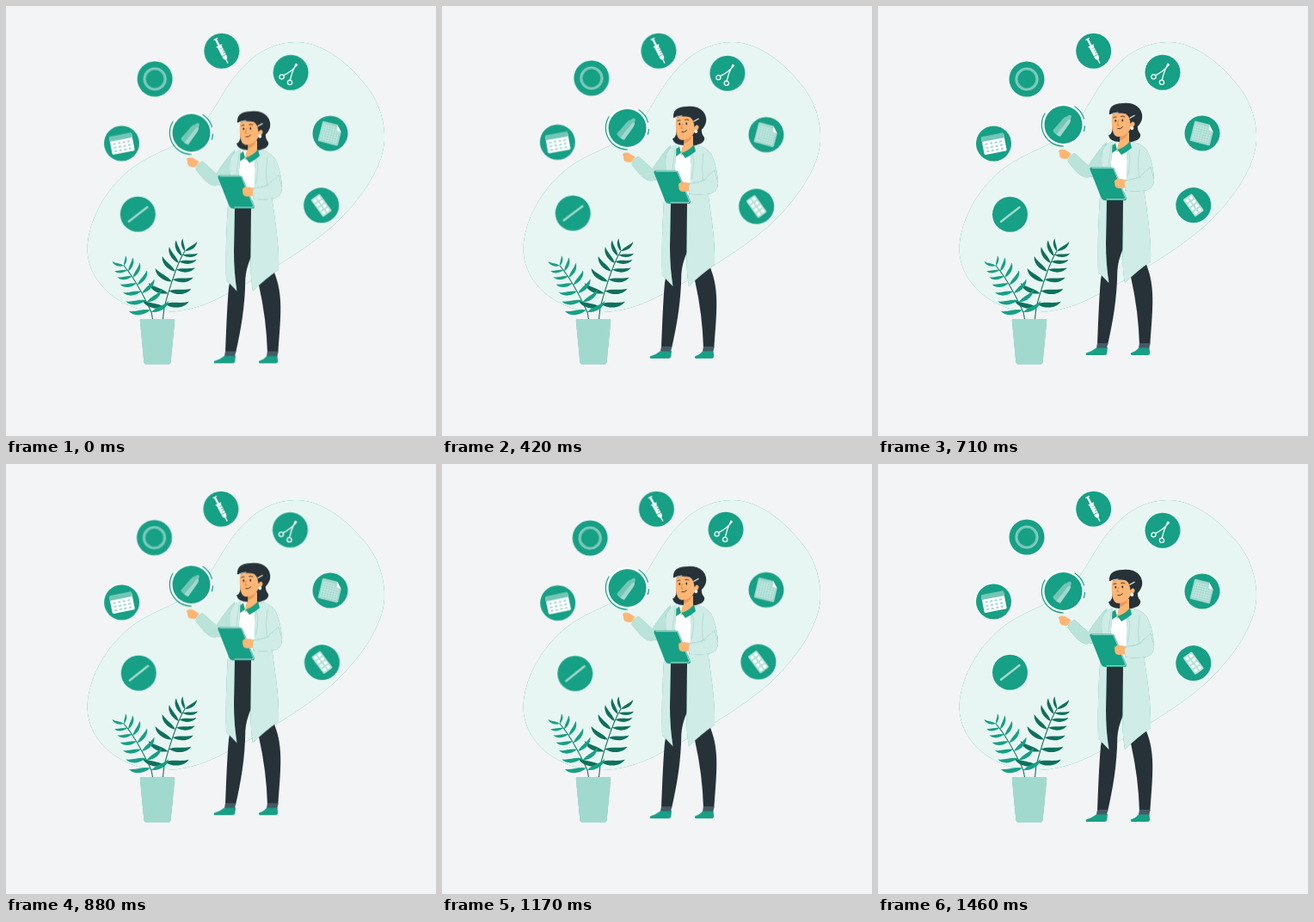
An HTML page for the animation above (1.5 s loop, 500x500 px).

```html
<!DOCTYPE html>
<html lang="en">
<head>
<meta charset="utf-8">
<title>Health care</title>
<style>
  html, body { margin: 0; height: 100%; overflow: hidden; background: #f3f4f6; }
  svg { display: block; width: 100vw; height: 100vh; }
  .teal { fill: #16a085; }
  .dark { fill: #263238; }
  .skin { fill: #ffb573; }
  .white { fill: #fff; }
  .line { fill: none; stroke-linecap: round; stroke-linejoin: round; }
  #orbit { transform-origin: 255.8px 147px; animation: sway 1.5s -40ms linear infinite; }
  #doctor { animation: rise 1.5s -40ms linear infinite; }
  @keyframes sway {
    0%, 100% { transform: rotate(0deg); }
    25% { transform: rotate(1deg); }
    75% { transform: rotate(-1deg); }
  }
  @keyframes rise {
    0%, 100% { transform: translateY(0); }
    50% { transform: translateY(-10px); }
  }
</style>
</head>
<body>
<svg viewBox="0 0 500 500">
  <path data-tint=".9" d="M337 42C372 42 402 71 420 94C434 112 441 135 440 157C438 188 414 224 380 256C345 286 300 312 262 332C240 345 212 357 178 356C138 355 95 326 94.5 282C96 250 113 217 142 192C172 168 205 164 228 139C248 115 255 88 285 62C298 51 316 42 337 42Z"/>

  <g id="plant"></g>
  <path data-tint=".6" d="M157.5 364H194.5Q196.4 364 196.2 366L191.6 414Q191.3 416.5 189 416.5H163Q160.700 416.5 160.4 414L155.8 366Q155.6 364 157.5 364Z"/>

  <g id="orbit">
    <g transform="translate(153.5 242.3)">
      <path class="line" stroke="#a2d9ce" stroke-width="2.4" d="M-10.5 8.5L11-8.3"/>
    </g>
    <g transform="translate(134.5 160)">
      <g id="calendar" transform="rotate(-11)">
        <rect class="white" x="-13" y="-9.5" width="26.5" height="20.5" rx="1.5"/>
        <path fill="#73c6b6" d="M-13-4.5V-9Q-13-10.5-11.5-10.5H12Q13.5-10.5 13.5-9V-4.5Z"/>
      </g>
    </g>
    <g transform="translate(173 85)">
      <circle class="line" r="12" stroke="#73c6b6" stroke-width="3.2"/>
      <circle class="line" r="12.8" stroke="#a2d9ce" stroke-width=".5"/>
    </g>
    <g transform="translate(250.7 52.3)">
      <g transform="rotate(-27)">
        <path class="line" stroke="#fff" stroke-width="1.2" d="M-2-15.5H2M-3-6.500H3M0 9V15.500"/>
        <path class="white" d="M-1.200-15H1.200V-6H2.600V8.500L1.400 11H-1.400L-2.600 8.500V-6H-1.200Z"/>
        <path class="line" stroke="#16a085" stroke-width=".7" d="M-2.200 5.800H2.200M.5-3H2M.5 0H2M.5 3H2"/>
      </g>
    </g>
    <g transform="translate(331 77.2)">
      <g class="line" stroke="#fff" stroke-width="1.3">
        <circle cx="-10.5" cy="5" r="2.600"/>
        <circle cx="-1" cy="11.5" r="2.600"/>
        <path d="M-8.5 3.5Q1-1 7.500-9M-.8 9Q1 0 6-10L7.500-9"/>
      </g>
    </g>
    <g transform="translate(377 148)">
      <g id="sheet" transform="rotate(14)">
        <path fill="#a2d9ce" d="M-12-10.5Q-12-12-10.5-12H5.5L12-4.500V10.5Q12 12 10.5 12H-10.5Q-12 12-12 10.5Z"/>
        <path class="white" d="M5.5-12L12-4.500L6.5-5.500Z"/>
      </g>
    </g>
    <g transform="translate(366.8 231.6)">
      <g id="pills" transform="rotate(-36)">
        <rect x="-6.3" y="-12.3" width="12.6" height="24.6" rx="1.3" fill="#b9e3da"/>
      </g>
    </g>
  </g>

  <g id="doctor">
    <!-- selected item -->
    <g transform="translate(215.5 148)">
      <circle class="white" r="24"/>
      <circle class="teal" r="22"/>
      <path class="line" stroke="#16a085" stroke-width="1.2" d="M-21.5-13A25 25 0 0 0 0 25M13.5-21A25 25 0 0 1 24-7M25 1.5A25 25 0 0 1 23.8 7.5"/>
      <g transform="rotate(38)">
        <path fill="#73c6b6" d="M-5.500 13L-4.700-5Q-4.500-9-2.500-10.500Q-2-14 0-14Q2-14 2.500-10.500Q4.500-9 4.700-5L5.500 13Q0 15.500-5.500 13Z"/>
        <path fill="#a2d9ce" d="M.5 14L1-8L2.500-10.500Q4.500-9 4.700-5L5.500 13Q3 14.200.5 14Z"/>
      </g>
    </g>

    <!-- legs -->
    <path id="shoe" class="teal" d="M254.5 407H267L266.3 413.5Q266 416 263 416H243Q241 415.5 242 413.5Q249 411.5 254.5 407Z"/>
    <path class="teal" d="M303.5 407H315.500L316.2 413.5Q316 416 313 416H295Q293.3 415.3 294 413.5Q300 411.5 303.5 407Z"/>
    <path class="dark" d="M289 300L294 325Q303 365 304 404H316.3C318 380 320 360 319 343C318 325 314 315 309 303Z"/>
    <path class="dark" d="M264 228H287L285 292Q279 306 278.3 318C278 350 273 378 267 404H255C256 380 257 350 259 328L264 300Z"/>
    <path fill="#455a64" d="M255 402H267.5L266 407.5H254ZM304 402H316.5L315.5 407.5H303Z"/>

    <!-- raised arm -->
    <path class="skin" d="M224.5 181.5L217 177Q212 175.5 210 178.5Q209.5 180 211 180.5Q210.5 186.5 214 187.3Q218 188.5 220.5 187.5Z"/>
    <path data-tint=".7" d="M266 168C259 174 252 185 244.5 195.5L228.5 181Q222 184 220.5 190C227 199 234 207 240 209Q250 211 264 201Z"/>

    <!-- shirt and coat -->
    <path class="white" d="M272 171L293 170L291 235H266Z"/>
    <path class="dark" d="M265 226H286L285 250H265Z"/>
    <path data-tint=".8" d="M273 168Q265 169 261 178C259 186 261 196 260 207C257 240 255 280 256 319L268.5 332Q265 310 265 286L266 232L271 192Z"/>
    <path data-tint=".8" d="M293 167Q306 169 313 178C318 188 321 202 321 213Q320 222 309.5 225C313 250 318 280 317 307Q300 319 287 332Q284 315 284.5 292L285 236Q292 204 289 177Z"/>
    <path class="line" stroke="#a2d9ce" stroke-width=".7" d="M304 177Q301 194 303.5 210M271 172L268 196M291 178L293 187L291 207"/>

    <!-- head -->
    <path class="dark" d="M272 148Q274 158 268 160.5Q270 168 281 168Q293 170 301 166Q306 163 305 159Q301 154 302 148L300 135Z"/>
    <path class="skin" d="M281.500 157H292V169Q287 177 277.5 180L279 171Q281.500 168 281.500 165Z"/>
    <path fill="#e89a5c" d="M281.500 160.5Q288 160 291 155Q290 164 281.500 166Z"/>
    <path class="skin" d="M272 137Q271 150 273.5 157Q275 162 280 162Q290 161 294 152Q299 150 298.5 146Q297 143 294 145L292 131L276 131Z"/>
    <path class="dark" d="M269 136Q268 125 281 123.3Q296 121 303 128Q309 135 306.5 143Q304 149 300.5 151Q299 143 295.5 144.5L293.5 147Q293 139 288.5 135.5Q281 133.5 273 135.8Z"/>
    <path class="line" stroke="#f4f8f8" stroke-width="1.2" d="M270.5 136.5Q274 133.8 279 134M292.8 140.3L298.2 137.3"/>
    <g class="dark"><ellipse cx="276.3" cy="143.3" rx=".9" ry="1.4"/><ellipse cx="284.3" cy="143" rx=".9" ry="1.4"/></g>
    <path class="line" stroke="#263238" stroke-width=".9" d="M273.7 139.8Q275 138.5 277 139M282.7 138.4Q285 137.3 287 138.8M278.8 152.6Q282 153.5 284.5 150.8"/>
    <path class="line" stroke="#e07d3c" stroke-width=".8" d="M279.5 143.5L278 148.3L280 148.6"/>
    <circle class="white" cx="295.3" cy="152" r="2"/>
    <path class="teal" d="M276 169.5L272.5 172L272 181L278 177ZM278.5 177Q288 174 293 167L295 175Q289 180 283 183Z"/>

    <!-- clipboard and lower sleeve -->
    <path class="teal" d="M248 197.5H271.5Q274 197.5 275 199.5L288.5 232.5Q289.5 236 287 236H264Q261 236 259.5 233L246.5 200Q246 197.5 248 197.5Z"/>
    <path class="line" stroke="#d0ece7" stroke-width=".8" d="M249 198.3H271.5Q273.5 198.3 274.3 200L287.5 232.5Q288 234.7 286 234.7H266"/>
    <path class="skin" d="M288 212L281 210.8Q275 211 275 214L275.5 218.5Q276 221.5 280 222L288 221.5Z"/>
    <path data-tint=".8" d="M304 208.5Q298 211 287.5 212.5Q286 218 287.5 224.5Q302 226.5 313 224Q321 221 321 212L317 197Z"/>
    <path class="line" stroke="#a2d9ce" stroke-width=".7" d="M287.5 212.7Q299 211.5 306 208.5"/>
  </g>
</svg>
<script>
const NS = 'http://www.w3.org/2000/svg';
const $ = id => document.getElementById(id);
const lerp = (a, b, t) => a + (b - a) * t;

function add(parent, tag, attrs) {
  const el = document.createElementNS(NS, tag);
  for (const k in attrs) el.setAttribute(k, attrs[k]);
  return parent.appendChild(el);
}

// A tint is solid teal under a translucent white copy, which leaves a fine edge.
for (const el of document.querySelectorAll('[data-tint]')) {
  const base = el.cloneNode();
  base.setAttribute('class', 'teal');
  el.before(base);
  el.setAttribute('class', 'white');
  el.setAttribute('fill-opacity', el.dataset.tint);
}

for (const icon of $('orbit').children)
  icon.prepend(add(icon, 'circle', { class: 'teal', r: 20.5 }));

// Crescent leaf; angle is measured from straight up, positive to the right.
function leaf(parent, [x, y], angle, len) {
  const side = Math.sign(angle);
  const a = angle * Math.PI / 180, dx = Math.sin(a) * len, dy = -Math.cos(a) * len;
  const at = (along, off) =>
    `${x + dx * along - dy * off * side} ${y + dy * along + dx * off * side}`;
  add(parent, 'path', {
    d: `M${x} ${y}C${at(.3, -.1)} ${at(.65, .06)} ${at(1, 0)}C${at(.8, .24)} ${at(.35, .27)} ${x} ${y}Z`
  });
}

// Leaves fan out on one side of a curved stem and lie flat on the other.
function frond({ color, top, bend, foot, root, dir, spread, tilt, size, apex }) {
  const g = add($('plant'), 'g', { fill: color });
  const onStem = t => [0, 1].map(i => lerp(lerp(top[i], bend[i], t), lerp(bend[i], foot[i], t), t));
  add(g, 'path', {
    class: 'line', stroke: '#0f705d', 'stroke-width': 1.1,
    d: `M${top}Q${bend} ${foot}L${root}`
  });
  leaf(g, top, apex, size * 1.2);
  for (let i = 0; i < 7; i++) {
    const t = i / 6;
    leaf(g, onStem(t), dir * lerp(9, spread, t), size + 12 * Math.sqrt(t));
    if (i < 6) leaf(g, onStem((i + .8) / 6), -dir * (90 - tilt), size + 3 + 12 * t);
  }
}

frond({ color: '#0f705d', top: [208, 285], bend: [198, 300], foot: [184, 350], root: [182.5, 364],
  dir: -1, spread: 72, tilt: 6, size: 15, apex: 52 });
frond({ color: '#16a085', top: [137, 302], bend: [152.5, 320], foot: [169, 356], root: [170.5, 364],
  dir: 1, spread: 57, tilt: -3, size: 12, apex: -70 });

for (let i = 0; i < 12; i++)
  add($('calendar'), 'rect', {
    x: -9.8 + i % 4 * 5.6, y: -2 + Math.floor(i / 4) * 4.3, width: 3, height: 2, fill: '#a2d9ce'
  });

for (let i = 0; i < 7; i++)
  add($('sheet'), 'path', {
    class: 'line', stroke: '#d0ece7', 'stroke-width': .6,
    d: `M-9.5 ${-8 + i * 2.8}H${i ? 9 : 4}M${-9.5 + i * 3.1} ${i > 4 ? -5 : -8}V9`
  });

for (let i = 0; i < 8; i++)
  add($('pills'), 'rect', {
    x: -5 + i % 2 * 5.6, y: -10.8 + Math.floor(i / 2) * 5.7, width: 4.4, height: 4.4, rx: 1.6,
    fill: '#fff', stroke: '#a2d9ce', 'stroke-width': .5
  });
</script>
</body>
</html>
```
